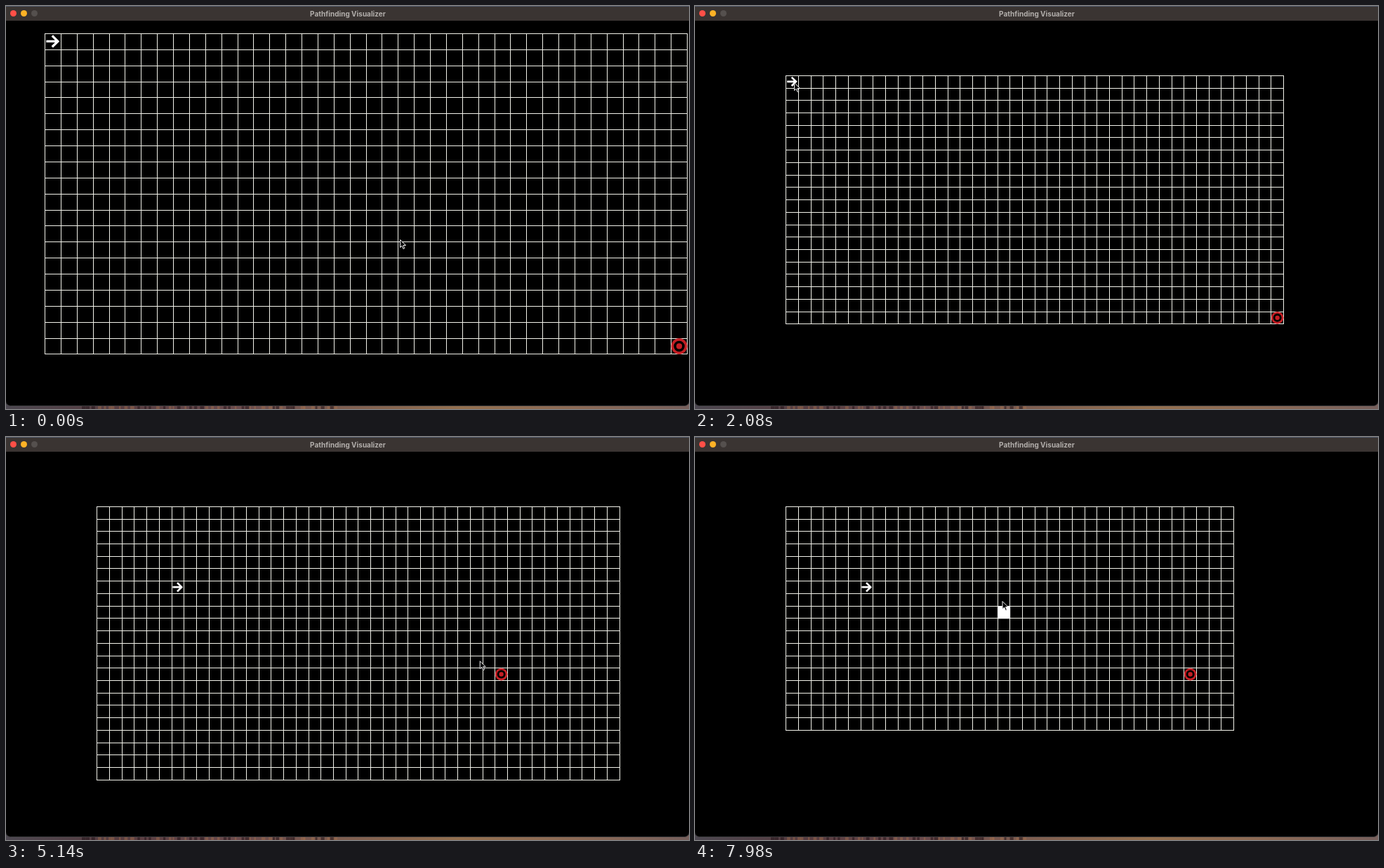
An HTML page with a canvas for the animation above (8000 ms loop, 973 px wide and 575 px high).

```html
<!DOCTYPE html>
<html lang="en">
<head>
<meta charset="utf-8">
<title>Pathfinding Visualizer</title>
<style>
  html, body { margin: 0; width: 100%; height: 100%; overflow: hidden; background: #000; }
  canvas { display: block; }
  .bar { position: absolute; left: 0; top: 0; width: 973px; height: 21px;
    background: #3a3432; box-shadow: inset 0 1px #505868; }
  .title { text-align: center; text-indent: 1px; white-space: nowrap; color: #b3afac;
    font: 700 10px/22px Inter, "Liberation Sans", sans-serif; }
  .light { position: absolute; left: 5.5px; top: 5.8px; width: 9.4px; height: 9.4px; border-radius: 50%;
    background: #ff4f47; }
  .light + .light { left: 20.6px; background: #fdb226; }
  .light + .light + .light { left: 35.7px; background: #55504e; }
</style>
</head>
<body>
<canvas id="stage" width="973" height="575"></canvas>
<div class="bar">
  <i class="light"></i><i class="light"></i><i class="light"></i>
  <div class="title">Pathfinding Visualizer</div>
</div>
<script>
const LOOP = 8000;
const ctx = document.getElementById('stage').getContext('2d');

const lerp = (a, b, k) => a + (b - a) * k;
const clamp = (v, lo, hi) => Math.min(hi, Math.max(lo, v));
const ease = (t, start, end) => {
  const k = clamp((t - start) / (end - start), 0, 1);
  return k * k * (3 - 2 * k);
};
const steps = (t, start, interval, max) => clamp(Math.floor((t - start) / interval), 0, max);
const pixel = v => Math.floor(v + .08);

const arrowDrag = { start: 2100, end: 2480, from: [0, 0], to: [6, 6] };
const targetDrag = { start: 3400, end: 4200, from: [39, 19], to: [32, 13] };
const wall = { time: 7860, cell: [17, 8] };

// Each move eases from wherever the pointer rests.
const pointerStart = { x: 561, y: 333 };
const pointerMoves = [
  { start: 0, end: 900, x: 518, y: 316.5 },
  { start: 1580, end: 2040, x: 141, y: 109 },
  { ...arrowDrag, x: 246, y: 214 },
  { start: 2540, end: 2960, x: 818, y: 424 },
  { ...targetDrag, x: 710, y: 331 },
  { start: 4500, end: 5200, x: 674, y: 319 },
  { start: 7000, end: 7980, x: 437.5, y: 234 }
];

const pointerAt = t => pointerMoves.reduce((p, move) => {
  const k = ease(t, move.start, move.end);
  return { x: lerp(p.x, move.x, k), y: lerp(p.y, move.y, k) };
}, pointerStart);

// Pan first, then zoom out around the resting pointer.
function viewAt(t) {
  const size = 23.585 * Math.pow(17.72 / 23.585, ease(t, 920, 1540));
  const pan = ease(t, 0, 900);
  return {
    x: lerp(55.5, 518.5 - 21.941 * size, pan),
    y: lerp(39.4, 316.5 - 12.257 * size, pan),
    size: lerp(22.875, size, pan)
  };
}

function gridSizeAt(t) {
  const grown = steps(t, 4640, 200, 5), shrunk = steps(t, 5960, 160, 7);
  return [40 + Math.min(grown, 3) - shrunk, 20 + grown - shrunk];
}

function draggedCell(t, { start, end, from, to }) {
  const k = ease(t, start, end);
  return from.map((v, i) => Math.round(lerp(v, to[i], k)));
}

function drawGrid({ x, y, size }, [cols, rows]) {
  const left = pixel(x), top = pixel(y);
  const width = pixel(x + cols * size) - left + 1;
  const height = pixel(y + rows * size) - top + 1;
  ctx.fillStyle = '#f2f2ea';
  for (let c = 0; c <= cols; c++) ctx.fillRect(pixel(x + c * size), top, 1, height);
  for (let r = 0; r <= rows; r++) ctx.fillRect(left, pixel(y + r * size), width, 1);
}

// Runs draw() with the cell as a unit square.
function inCell({ x, y, size }, [col, row], draw) {
  ctx.save();
  ctx.translate(x + col * size, y + row * size);
  ctx.scale(size, size);
  draw();
  ctx.restore();
}

function drawWall() {
  ctx.fillStyle = '#fff';
  ctx.fillRect(0, 0, 1.03, 1.03);
}

function drawArrow() {
  ctx.strokeStyle = '#fff';
  ctx.lineWidth = .15;
  ctx.beginPath();
  ctx.moveTo(.08, .48);
  ctx.lineTo(.79, .48);
  ctx.moveTo(.45, .13);
  ctx.lineTo(.8, .48);
  ctx.lineTo(.45, .83);
  ctx.stroke();
}

function drawTarget() {
  ctx.strokeStyle = ctx.fillStyle = '#c41e24';
  ctx.lineWidth = .16;
  ctx.beginPath();
  ctx.arc(.5, .5, .42, 0, 7);
  ctx.stroke();
  ctx.beginPath();
  ctx.arc(.5, .5, .18, 0, 7);
  ctx.fill();
}

const pointerShape = new Path2D('M0 0V11L2.6 8.7 4.5 13 6.3 12.2 4.5 8H8Z');
function drawPointer({ x, y }) {
  ctx.save();
  ctx.translate(x + .5, y + .5);
  ctx.fillStyle = '#000';
  ctx.strokeStyle = '#f4f4f4';
  ctx.fill(pointerShape);
  ctx.stroke(pointerShape);
  ctx.restore();
}

function drawDesktop() {
  const tones = ctx.createLinearGradient(0, 0, 973, 0);
  ['#4c4750', '#583c40', '#6b4a4c', '#805f50', '#94704f', '#8d6a55', '#77605c']
    .forEach((tone, i, all) => tones.addColorStop(i / (all.length - 1), tone));
  ctx.fillStyle = tones;
  ctx.fillRect(0, 560, 973, 15);
  let seed = 7;
  const random = () => (seed = seed * 16807 % 2147483647) / 2147483647;
  for (let x = 108; x < 470; x += 4 + random() * 7) {
    ctx.fillStyle = random() < .5 ? '#24141a90' : '#a5704d70';
    ctx.fillRect(x, 571, 2 + random() * 4, 4);
  }
}

function drawWindow() {
  ctx.fillStyle = '#000';
  ctx.strokeStyle = '#3c3c3e';
  ctx.lineWidth = 1;
  ctx.beginPath();
  ctx.roundRect(-.5, -10, 974, 580.5, 7);
  ctx.fill();
  ctx.stroke();
}

function render(t) {
  const view = viewAt(t);
  drawDesktop();
  drawWindow();
  drawGrid(view, gridSizeAt(t));
  if (t >= wall.time) inCell(view, wall.cell, drawWall);
  inCell(view, draggedCell(t, arrowDrag), drawArrow);
  inCell(view, draggedCell(t, targetDrag), drawTarget);
  drawPointer(pointerAt(t));
}

const start = performance.now();
function tick() {
  render((performance.now() - start) % LOOP);
  requestAnimationFrame(tick);
}
tick();
</script>
</body>
</html>
```
